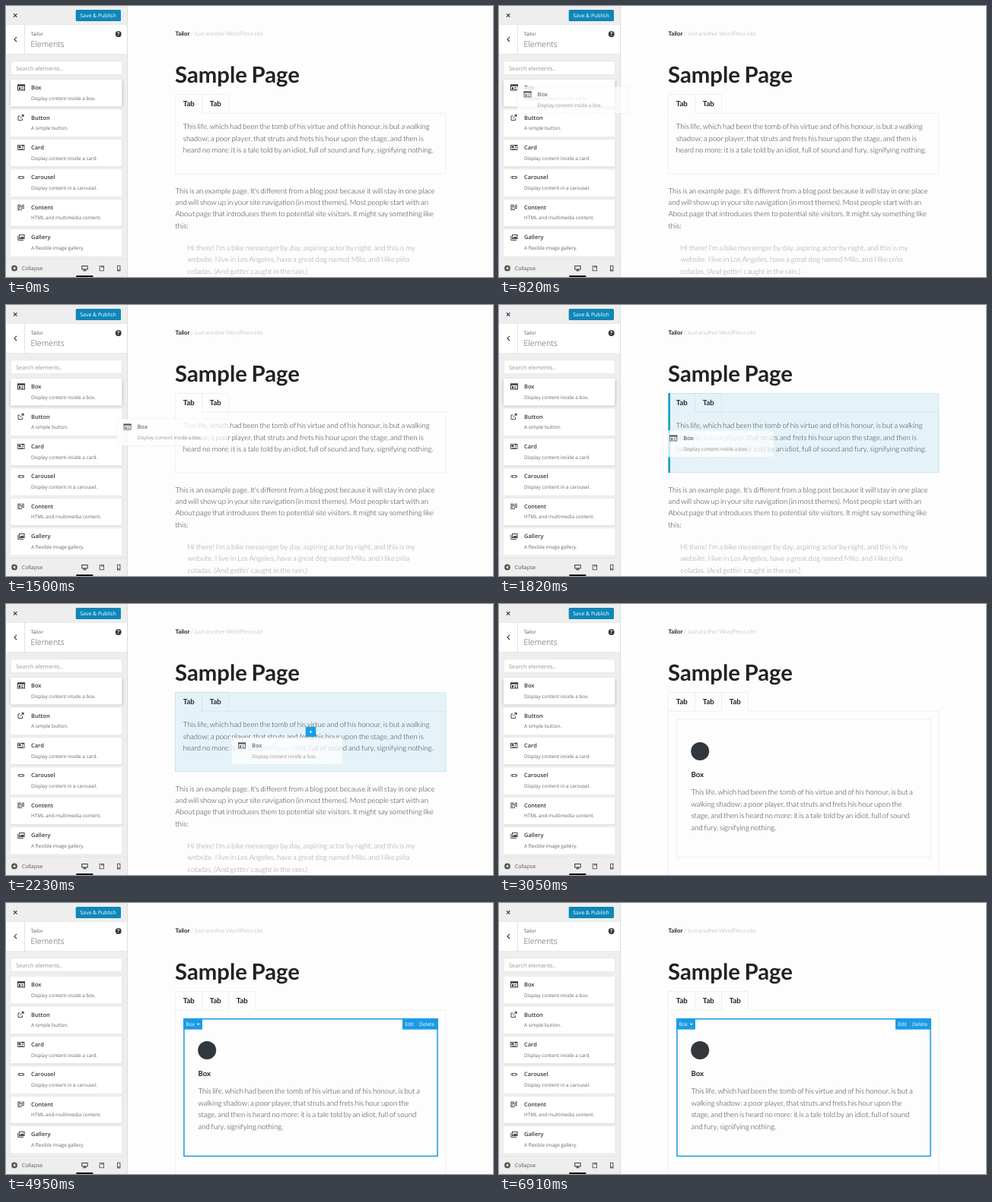
These frames come from a looping animation (640x357 px, 6.96 s). An HTML page with a canvas:

```html
<!DOCTYPE html>
<html lang="en">
<head>
<meta charset="utf-8">
<title>Page builder</title>
<style>
html, body { margin: 0; width: 100%; height: 100%; overflow: hidden; background: #fdfdfd; }
canvas { display: block; width: 640px; height: 357px; }
</style>
</head>
<body>
<canvas id="stage"></canvas>
<script>
const W = 640, H = 357, LOOP = 6960;
const DRAG = 550, DROP = 2640, SELECT = 4360;
const SANS = '"Open Sans", sans-serif', LATO = 'Lato, sans-serif';
const LATO_SPACE = 0.193; // word gap in em
const BLUE = '#1a9be6', INK = '#32373c', DARK = '#222', LINE = '#ececee';

const canvas = document.getElementById('stage');
const ratio = window.devicePixelRatio || 1;
canvas.width = Math.round(W * ratio);
canvas.height = Math.round(H * ratio);
const g = canvas.getContext('2d');
g.textRendering = 'geometricPrecision';

const clamp = v => Math.max(0, Math.min(1, v));
const ease = v => { v = clamp(v); return v * v * (3 - 2 * v); };

function rect(x, y, w, h, color) {
  g.fillStyle = color;
  g.fillRect(x, y, w, h);
}

function frame(x, y, w, h, color, line = 1) {
  g.strokeStyle = color;
  g.lineWidth = line;
  g.strokeRect(x + line / 2, y + line / 2, w - line, h - line);
}

function text(str, x, y, size, color, weight = 400) {
  g.wordSpacing = '0px';
  g.font = `${weight} ${size}px ${SANS}`;
  g.fillStyle = color;
  g.fillText(str, x, y);
}

function lato(str, x, y, size, color, weight) {
  g.wordSpacing = '0px';
  g.font = `${weight} ${size}px ${LATO}`;
  g.wordSpacing = `${LATO_SPACE * size - g.measureText(' ').width}px`;
  g.fillStyle = color;
  g.fillText(str, x, y);
}

function lines(list, x, y, step, color) {
  list.forEach((s, i) => lato(s, x, y + i * step, 9.6, color, 300));
}

function path(points, color, line = 1) {
  g.strokeStyle = color;
  g.lineWidth = line;
  g.beginPath();
  points.forEach(([x, y], i) => i ? g.lineTo(x, y) : g.moveTo(x, y));
  g.stroke();
}

function disc(x, y, r, color) {
  g.fillStyle = color;
  g.beginPath();
  g.arc(x, y, r, 0, 2 * Math.PI);
  g.fill();
}

function shape(points, color) {
  g.fillStyle = color;
  g.beginPath();
  points.forEach(([x, y]) => g.lineTo(x, y));
  g.fill();
}

// Each icon sits in a 10 by 9 area.
const icons = {
  Box() {
    frame(0, 0.5, 10, 8, INK);
    rect(0, 0.5, 10, 2.2, INK);
    rect(2, 4, 2, 3, INK);
    rect(5, 4, 3, 0.8, INK);
    rect(5, 6, 3, 0.8, INK);
  },
  Button() {
    path([[3.5, 2.5], [1, 2.5], [1, 8], [6.5, 8], [6.5, 5.5]], INK, 0.9);
    path([[3.5, 5.5], [7.5, 1.5]], INK, 1);
    shape([[5, 0.5], [8.5, 0.5], [8.5, 4]], INK);
  },
  Card() {
    frame(0, 1, 9.5, 7, INK, 0.8);
    rect(1.5, 2.5, 3, 2.5, INK);
    rect(6, 4, 2, 0.8, INK);
    rect(2, 6, 5.5, 0.8, INK);
    rect(6, 1, 2, 2, INK);
  },
  Carousel() {
    frame(2, 2.8, 5.6, 3.4, INK, 0.8);
    path([[2, 2.8], [0.5, 4.5], [2, 6.2]], INK, 0.8);
    path([[7.6, 2.8], [9.1, 4.5], [7.6, 6.2]], INK, 0.8);
  },
  Content() {
    [[0, 1, 5], [6, 1, 3], [0, 3, 9], [0, 5, 3], [5, 5, 4], [0, 7, 6]]
      .forEach(([x, y, w]) => rect(x, y, w, 1, INK));
  },
  Gallery() {
    path([[0.8, 2.5], [0.8, 8.2], [8, 8.2]], INK, 0.9);
    frame(2, 0.8, 7.6, 6, INK, 0.9);
    shape([[3, 6], [5, 3.5], [6, 4.5], [7.2, 2.8], [8.8, 6]], INK);
  }
};

const items = [
  ['Box', 'Display content inside a box.'],
  ['Button', 'A simple button.'],
  ['Card', 'Display content inside a card.'],
  ['Carousel', 'Display content in a carousel.'],
  ['Content', 'HTML and multimedia content.'],
  ['Gallery', 'A flexible image gallery.']
];

function label([name, info], x, y) {
  g.save();
  g.translate(x + 9, y + 6);
  icons[name]();
  g.restore();
  text(name, x + 27, y + 13.1, 7.47, INK, 600);
  text(info, x + 27, y + 26.6, 6.4, '#666');
}

function card(item, y, lift) {
  g.save();
  g.shadowColor = `rgba(0,0,0,${0.13 + 0.14 * lift})`;
  g.shadowBlur = (1.5 + 1.5 * lift) * ratio;
  g.shadowOffsetY = 0.5 * ratio;
  rect(6, y, 146.5, 35.5, '#fff');
  g.restore();
  label(item, 6, y);
}

function sidebar(t) {
  rect(0, 0, 160, H, '#eee');
  rect(0, 24, 159, 40, '#fff');
  rect(0, 24, 159, 0.6, '#ddd');
  rect(0, 63.4, 159, 0.6, '#ddd');
  rect(24, 24, 0.8, 40, '#ddd');
  path([[10, 10.2], [14.4, 14.6]], INK, 1.2);
  path([[14.4, 10.2], [10, 14.6]], INK, 1.2);
  path([[14, 40.8], [11, 43.9], [14, 47]], INK, 1.1);

  g.fillStyle = '#0f87b9';
  g.beginPath();
  g.roundRect(91.7, 5, 59.3, 15, 1.5);
  g.fill();
  text('Save & Publish', 97.3, 15, 6.93, '#fff');

  text('Tailor', 32.5, 39, 6.4, '#555');
  text('Elements', 32.5, 53.8, 10.67, '#555', 300);
  disc(147.7, 37, 3.9, INK);
  text('?', 146.1, 39.4, 6.6, '#fff', 700);

  rect(6, 72.5, 146.5, 18.5, '#fff');
  frame(6, 72.5, 146.5, 18.5, '#ddd', 0.6);
  text('Search elements..', 13, 84.6, 7.47, '#999');

  const lift = 1 - ease((t - SELECT) / 200);
  items.forEach((item, i) => card(item, 97 + i * 39.45, i ? 0 : lift));

  rect(0, 333.5, 159, 24, '#eee');
  rect(0, 333.5, 159, 0.6, '#ddd');
  disc(11, 345.4, 3.9, '#555');
  shape([[12.2, 343.2], [12.2, 347.6], [9, 345.4]], '#eee');
  text('Collapse', 20.8, 347.9, 6.93, '#555');
  rect(92.3, 355, 22, 2, '#111');
  frame(99.2, 342, 8.4, 5.4, INK);
  rect(102.4, 347, 2, 1.6, INK);
  rect(101, 348.4, 4.8, 0.8, INK);
  frame(122.7, 342, 6.2, 7.2, '#555', 0.9);
  rect(125.2, 343, 2.5, 2, '#888');
  frame(146, 341.8, 4.4, 7.6, '#444', 0.9);
  rect(147, 347.4, 2.4, 1, '#444');
  rect(159, 0, 1, H, '#ddd');
}

function tabs(count, active) {
  for (let i = 0; i < count; i++) {
    const x = 222.5 + i * 35;
    path([[x, 141], [x, 116.5], [x + 35, 116.5], [x + 35, 141]], LINE, 0.8);
    lato('Tab', x + 10.3, 132.3, 9.6, DARK, 700);
  }
  const x = 222.5 + active * 35;
  path([[222.5, H], [222.5, 141.4], [x, 141.4]], LINE, 0.8);
  path([[x + 35, 141.4], [578, 141.4], [578, H]], LINE, 0.8);
}

function firstPage() {
  g.save();
  g.beginPath();
  g.rect(160, 100, 480, 120.8);
  g.clip();
  tabs(2, 0);
  g.restore();
  path([[222.1, 220.8], [578.4, 220.8]], LINE, 0.8);
  lines([
    'This life, which had been the tomb of his virtue and of his honour, is but a walking',
    'shadow; a poor player, that struts and frets his hour upon the stage, and then is',
    'heard no more: it is a tale told by an idiot, full of sound and fury, signifying nothing.'
  ], 232.8, 162.3, 15.4, '#333');
  lines([
    "This is an example page. It's different from a blog post because it will stay in one place",
    'and will show up in your site navigation (in most themes). Most people start with an',
    'About page that introduces them to potential site visitors. It might say something like',
    'this:'
  ], 222.5, 246.6, 15.4, '#333');
  lines([
    "Hi there! I'm a bike messenger by day, aspiring actor by night, and this is my",
    'website. I live in Los Angeles, have a great dog named Milo, and I like piña',
    "coladas. (And gettin' caught in the rain.)"
  ], 238.5, 322, 15.4, '#999');
}

// Stops of the drag: time, x, y, and the speed there per ms.
const stops = [
  [550, 0, 0, 0, 0],
  [1270, 93, 40, 0.19, 0.06],
  [1820, 209, 68, 0.22, 0.04],
  [2230, 290, 79, 0.02, 0.004],
  [2500, 291, 79, 0, 0]
];

function dragAt(t) {
  const n = stops.findIndex(s => t < s[0]);
  if (n < 0) return stops[stops.length - 1].slice(1, 3);
  const a = stops[n - 1], b = stops[n], d = b[0] - a[0], u = (t - a[0]) / d;
  const mix = k => (1 + 2 * u) * (1 - u) ** 2 * a[k] + u * (1 - u) ** 2 * d * a[k + 2]
    + u * u * (3 - 2 * u) * b[k] + u * u * (u - 1) * d * b[k + 2];
  return [mix(1), mix(2)];
}

function dropTarget(x) {
  if (x < 162) return;
  rect(222, 116, 356.4, 105, 'rgba(26,160,215,0.1)');
  g.setLineDash([1, 1]);
  frame(222, 116, 356.4, 105, 'rgba(26,150,210,0.22)', 0.8);
  g.setLineDash([]);
  if (x < 251) {
    rect(222.4, 116, 2.6, 105, '#12a5c8');
  } else {
    rect(393.7, 161.7, 13.6, 13.2, BLUE);
    rect(398.6, 168, 4, 0.8, '#fff');
    rect(400.2, 166.4, 0.8, 4, '#fff');
  }
}

function ghost(dx, dy) {
  const x = 6 + dx, y = 97 + dy;
  const fade = g.createLinearGradient(x, 0, x + 146, 0);
  fade.addColorStop(0, 'rgba(254,254,254,0.75)');
  fade.addColorStop(0.5, 'rgba(254,254,254,0.86)');
  fade.addColorStop(1, 'rgba(254,254,254,0.65)');
  rect(x, y, 146.5, 35.5, fade);
  frame(x - 0.5, y - 0.5, 147.5, 36.5, 'rgba(0,0,0,0.04)');
  g.globalAlpha = 0.7;
  label(items[0], x, y);
  g.globalAlpha = 1;
}

function secondPage(t) {
  tabs(3, 2);
  g.globalAlpha = ease((t - DROP) / 360);
  frame(232.8, 151.4, 335, 182.8, LINE, 0.8);
  disc(264.2, 194, 12, INK);
  lato('Box', 252.5, 227.7, 9.6, DARK, 700);
  lines([
    'This life, which had been the tomb of his virtue and of his honour, is but a',
    'walking shadow: a poor player, that struts and frets his hour upon the',
    'stage, and then is heard no more: it is a tale told by an idiot, full of sound',
    'and fury, signifying nothing.'
  ], 252.5, 251, 15.5, '#333');
  g.globalAlpha = 1;
  if (t < SELECT) return;
  frame(233.2, 152, 334.6, 182.2, BLUE, 1.5);
  rect(233.2, 152, 24.8, 14.6, BLUE);
  text('Box', 236.4, 162, 6.6, '#fff');
  shape([[250.6, 158.7], [254.8, 158.7], [252.7, 161]], '#fff');
  rect(521, 152, 46.8, 14.6, BLUE);
  text('Edit', 524.2, 162, 6.6, '#fff');
  text('Delete', 543, 162, 6.6, '#fff');
}

function draw(t) {
  g.setTransform(ratio, 0, 0, ratio, 0, 0);
  rect(0, 0, W, H, '#fdfdfd');
  lato('Tailor', 222.5, 38.8, 7.68, DARK, 700);
  lato('/ Just another WordPress site', 242.8, 38.8, 7.68, '#aaa', 300);
  lato('Sample Page', 222, 101.3, 29.3, DARK, 700);
  if (t < DROP) firstPage();
  else secondPage(t);
  sidebar(t);
  if (t >= DRAG && t < DROP) {
    const [x, y] = dragAt(t);
    dropTarget(x);
    ghost(x, y);
  }
}

function tick() {
  draw(performance.now() % LOOP);
  requestAnimationFrame(tick);
}
tick();
</script>
</body>
</html>
```
